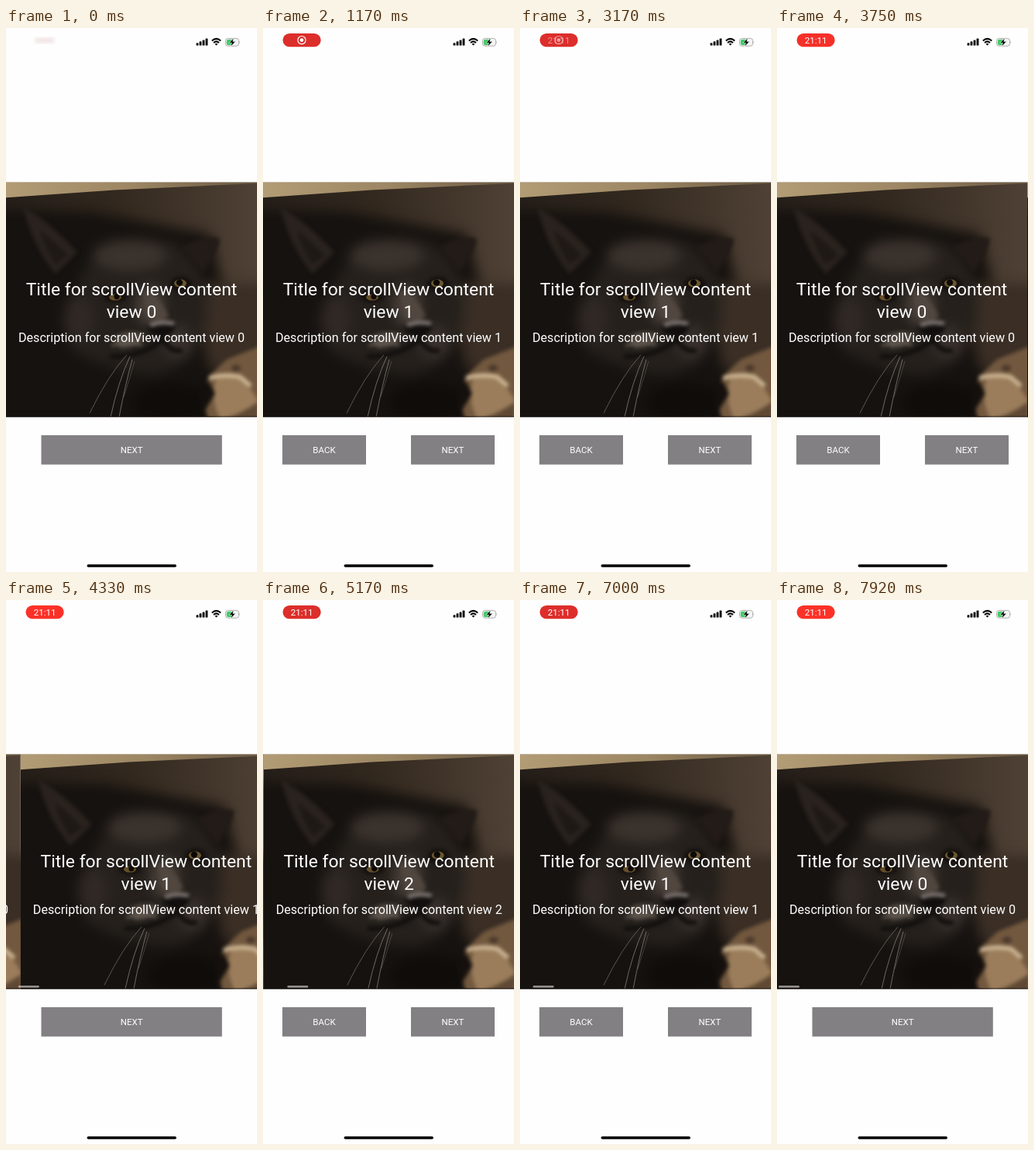
Recreate the animation shown at these times as an HTML page. Size 324 px wide and 700 px high, loop 8080 ms.

```html
<!DOCTYPE html>
<html lang="en">
<head>
<meta charset="utf-8">
<title>Paged scroll view</title>
<style>
  html, body { margin: 0; width: 100%; height: 100%; overflow: hidden; background: #fefefe; }
  svg { display: block; }
  filter { color-interpolation-filters: sRGB; }
  text { font-family: Roboto, Inter, sans-serif; fill: #fff; text-anchor: middle; }
  .title { font-size: 22.9px; }
  .desc { font-size: 16.15px; }
  .label { font-size: 11.5px; }
  .clock { font-size: 11.6px; }
</style>
</head>
<body>
<svg id="stage" width="324" height="700" viewBox="0 0 324 700">
  <defs>
    <filter id="soft" x="-30%" y="-30%" width="160%" height="160%"><feGaussianBlur stdDeviation="8"/></filter>
    <filter id="smooth" x="-30%" y="-30%" width="160%" height="160%"><feGaussianBlur stdDeviation="2.8"/></filter>
    <filter id="edge"><feGaussianBlur stdDeviation=".7"/></filter>
    <linearGradient id="wall">
      <stop offset="0" stop-color="#251e19"/><stop offset=".45" stop-color="#33291f"/><stop offset="1" stop-color="#4f4135"/>
    </linearGradient>
    <linearGradient id="strip">
      <stop offset="0" stop-color="#b39d76"/><stop offset=".5" stop-color="#9c8663"/><stop offset="1" stop-color="#655440"/>
    </linearGradient>

    <symbol id="photo" viewBox="0 0 324 302">
      <rect width="324" height="302" fill="url(#wall)"/>
      <g filter="url(#soft)">
        <path d="M-30 36L110 38L262 66L280 130L268 330H-30Z" fill="#16120f"/>
        <path d="M240 130H350V240H262Z" fill="#3a2e25"/>
        <path d="M120 88Q170 62 226 82Q266 116 258 180Q240 240 190 248Q120 240 84 214Q70 150 120 88Z" fill="#25201c"/>
        <ellipse cx="160" cy="94" rx="48" ry="20" fill="#3a322d"/>
        <ellipse cx="94" cy="176" rx="20" ry="32" fill="#2f2824"/>
        <ellipse cx="186" cy="158" rx="18" ry="26" fill="#4a413b"/>
        <ellipse cx="222" cy="206" rx="20" ry="22" fill="#38302c"/>
        <ellipse cx="212" cy="284" rx="50" ry="26" fill="#0f0c0a"/>
      </g>
      <g filter="url(#smooth)">
        <path d="M22 32Q56 50 92 90L64 118Q34 82 22 32Z" fill="#29221e"/>
        <path d="M44 62Q62 76 80 94L64 106Q50 86 44 62Z" fill="#1f1916"/>
        <path d="M226 84Q256 66 276 72Q274 92 254 116Z" fill="#221b17"/>
        <ellipse cx="141" cy="147" rx="15" ry="8" fill="#15110f"/>
        <ellipse cx="226" cy="131" rx="14" ry="10" fill="#15110f"/>
        <path d="M176 140Q196 142 210 172Q200 182 184 174Z" fill="#51473f"/>
        <path d="M138 200Q156 186 180 196Q174 212 148 214Z" fill="#4f463f"/>
        <path d="M181 186Q200 178 219 183Q216 197 203 199Q188 198 181 186Z" fill="#110e0d"/>
        <path d="M186 184Q202 178 217 182" fill="none" stroke="#847c78" stroke-width="5"/>
        <path d="M134 224Q172 226 203 202Q212 220 228 216" fill="none" stroke="#120f0d" stroke-width="6"/>
        <path d="M136 210Q156 205 176 209" fill="none" stroke="#6c635c" stroke-width="3"/>
        <path d="M262 250L285 228L330 210V310H264Q250 286 262 250Z" fill="#72583e"/>
        <path d="M272 250Q290 242 302 250Q318 266 330 290V310H280Q262 284 272 250Z" fill="#9b7d5b"/>
        <path d="M262 252Q280 246 302 250L316 262" fill="none" stroke="#d3bd9b" stroke-width="5"/>
        <path d="M270 308Q302 300 326 282V308Z" fill="#5f4934"/>
        <ellipse cx="297" cy="239" rx="6" ry="4" fill="#49372a"/>
        <path d="M262 256L270 272L254 298L250 270Z" fill="#15100d"/>
      </g>
      <g filter="url(#edge)">
        <path d="M-5 -5H330V1L140 10L-5 20Z" fill="url(#strip)"/>
        <ellipse cx="141" cy="148" rx="8" ry="4" fill="#654e28"/>
        <ellipse cx="225" cy="130" rx="8" ry="5" fill="#6b572f"/>
        <circle cx="143" cy="147" r="3.6" fill="#0c0a08"/>
        <circle cx="224" cy="129" r="4.2" fill="#0c0a08"/>
      </g>
      <g fill="none" stroke="#aaa39d" stroke-width="1" opacity=".6">
        <path d="M160 224Q145 256 135 302"/>
        <path d="M163 228Q154 260 146 302"/>
        <path d="M156 222Q132 248 108 297" opacity=".8"/>
        <path d="M166 230Q160 252 152 276" opacity=".5"/>
      </g>
      <rect y="301" width="324" height="1" fill="#0b0908"/>
    </symbol>
  </defs>

  <rect width="324" height="700" fill="#fefefe"/>
  <g id="pages"></g>
  <rect id="indicator" y="496.3" width="27" height="2.4" rx="1.2" fill="#d8d2ce"/>
  <g id="buttons"></g>

  <g id="smear" filter="url(#smooth)"><rect x="38" y="13" width="24" height="6" fill="#f0dfdf"/></g>
  <g id="pill">
    <rect id="pillFill" x="25.5" y="6.9" width="49.2" height="17.4" rx="8.7"/>
    <text id="clock" class="clock" x="50.2" y="19.8">21:11</text>
    <g id="record">
      <circle cx="50" cy="15.6" r="5.1" fill="none" stroke="#fff" stroke-width="1.2"/>
      <circle cx="50" cy="15.6" r="2.4" fill="#fff"/>
    </g>
  </g>

  <g id="signal"></g>
  <g fill="none" stroke="#000" stroke-width="2">
    <path d="M265.8 16.4Q271.5 11.4 277.2 16.4"/>
    <path d="M268 18.9Q271.5 15.9 275 18.9"/>
  </g>
  <path d="M269.6 20.4Q271.5 19 273.4 20.4L271.5 22.6Z"/>
  <rect x="283.5" y="13.4" width="17" height="9.8" rx="3" fill="#f4f4f4" stroke="#a5a5a7" stroke-width=".9"/>
  <path d="M287 14.7H291.6V21.9H287Q284.8 21.9 284.8 19.7V16.9Q284.8 14.7 287 14.7Z" fill="#3ccb63"/>
  <path d="M301.5 16.7Q303 18.3 301.5 19.9Z" fill="#a5a5a7"/>
  <path d="M294.2 12.6L287.9 19.2H291.4L290 24L296.3 17.3H292.8Z" stroke="#fff" stroke-width=".6"/>
  <rect x="104.5" y="690.2" width="115.5" height="3.6" rx="1.8"/>
</svg>
<script>
const LOOP = 8080, WIDTH = 324;
const $ = id => document.getElementById(id);
const clamp = (v, lo = 0, hi = 1) => Math.min(hi, Math.max(lo, v));
const ramp = (t, from, to) => clamp((t - from) / (to - from));
const easeInOut = u => u * u * (3 - 2 * u);
const easeOut = u => 1 - (1 - u) ** 3;

// Button taps scroll with easeInOut, finger swipes settle with easeOut.
const tap = (start, end, from, to) => ({ start, end, from, to, ease: easeInOut, tapped: true });
const swipe = (start, end, from, to) => ({ start, end, from, to, ease: easeOut });
const moves = [
  tap(850, 1170, 0, 1), tap(1750, 2060, 1, 2), tap(2600, 2910, 2, 1), tap(3450, 3760, 1, 0),
  swipe(4000, 4539, 0, 1), swipe(4700, 5240, 1, 2), swipe(5380, 5920, 2, 3),
  swipe(6100, 6615, 3, 2), swipe(6615, 7000, 2, 1), swipe(7120, 7700, 1, 0)
];

const button = (id, x, width, label) => `<g id="${id}">
  <rect x="${x}" y="524" width="${width}" height="37.7" fill="#828083"/>
  <text class="label" x="${x + width / 2}" y="547">${label}</text></g>`;

$('pages').innerHTML = [0, 1, 2, 3].map(n => `<g transform="translate(${n * WIDTH} 0)">
  <use href="#photo" y="198.6" width="324" height="302"/>
  <text class="title" x="162" y="344">Title for scrollView content</text>
  <text class="title" x="162" y="373">view ${n}</text>
  <text class="desc" x="162" y="404">Description for scrollView content view ${n}</text></g>`).join('');

$('buttons').innerHTML = button('wideNext', 45.5, 233.3, 'NEXT') +
  `<g id="pair">${button('back', 25, 108, 'BACK')}${button('next', 191, 108, 'NEXT')}</g>`;

$('signal').innerHTML = [0, 1, 2, 3].map(i => {
  const h = 3.4 + i * 1.9;
  return `<rect x="${245.6 + i * 4}" y="${22.6 - h}" width="2.8" height="${h}" rx=".7"/>`;
}).join('');

const show = (id, opacity) => $(id).setAttribute('opacity', opacity);
const dim = (id, on) => $(id).querySelector('text').setAttribute('opacity', on ? .35 : 1);

function snap(t) {
  const part = t % 250;
  return t - part + (part < 80 ? 0 : part < 170 ? 80 : 170);
}

function render(t) {
  let offset = 0, page = 0;
  for (const m of moves) {
    if (t < m.start) break;
    offset = m.from + (m.to - m.from) * m.ease(ramp(t, m.start, m.end));
    page = t >= m.end ? m.to : m.from;
  }
  $('pages').setAttribute('transform', `translate(${-offset * WIDTH} 0)`);
  $('indicator').setAttribute('x', 2 + offset * 14.7);
  show('indicator', t >= 4000 ? .7 : 0);

  show('wideNext', page === 0 ? 1 : 0);
  show('pair', page === 0 ? 0 : 1);
  const pressed = moves.find(m => m.tapped && t >= m.start - 180 && t < m.start);
  const forward = !!pressed && pressed.to > pressed.from;
  dim('wideNext', forward);
  dim('next', forward);
  dim('back', !!pressed && !forward);

  const glow = (1 + Math.cos((t - 100) / 1000 * Math.PI)) / 2;
  const mix = (a, b) => Math.round(a + (b - a) * glow);
  $('pillFill').setAttribute('fill', `rgb(${mix(220, 255)},${mix(46, 49)},${mix(43, 40)})`);
  show('smear', 1 - ramp(t, 0, 200));
  show('pill', ramp(t, 0, 330));
  const clockIn = ramp(t, 3000, 3340);
  show('clock', clockIn);
  show('record', 1 - clockIn);
}

const begin = performance.now();
function tick() {
  render(snap((performance.now() - begin) % LOOP));
  requestAnimationFrame(tick);
}
tick();
</script>
</body>
</html>
```
